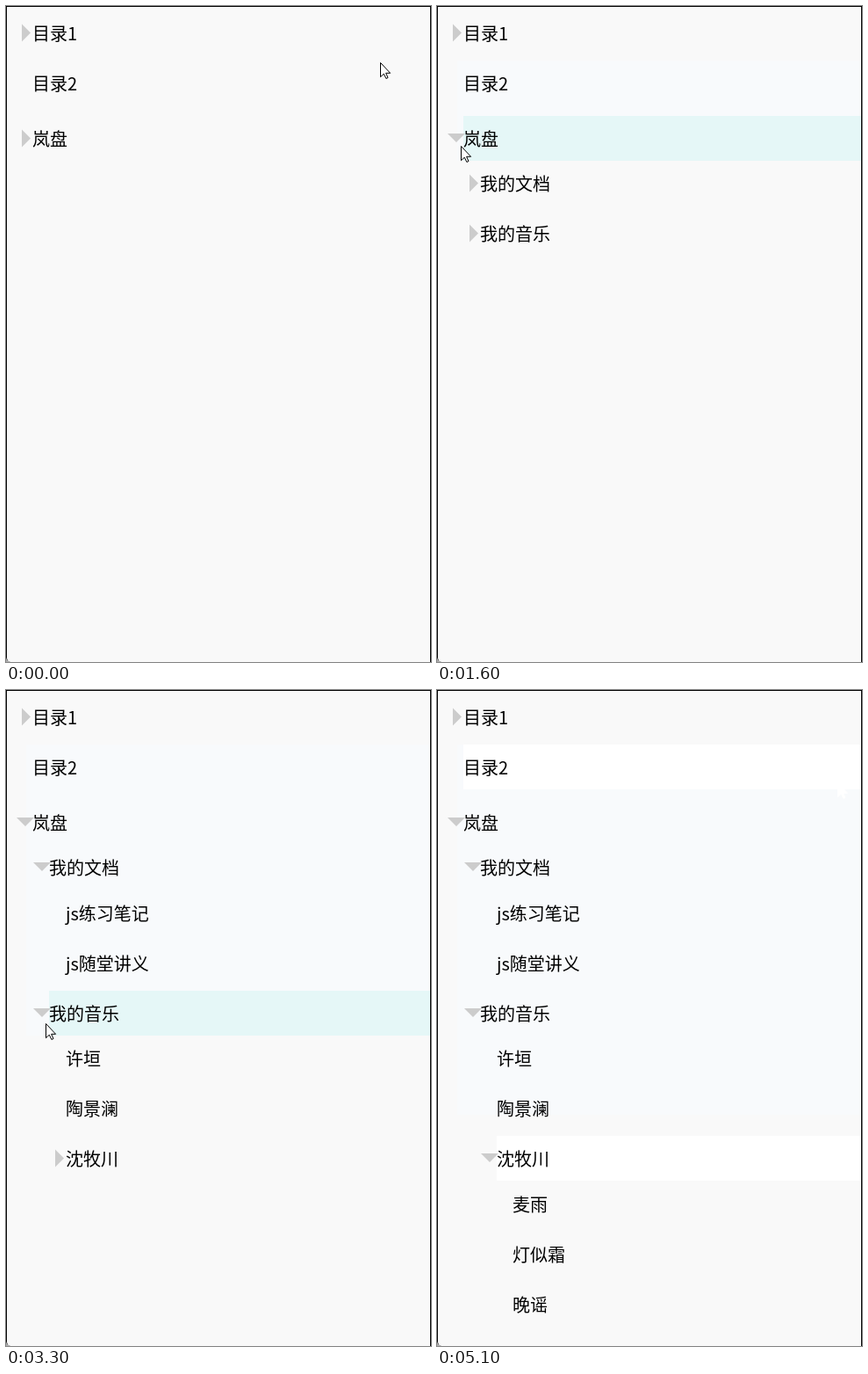
Animation, 484 px wide and 746 px high, one loop 5700 ms. Source, as an HTML page:

```html
<!DOCTYPE html>
<html lang="zh-CN">
<head>
<meta charset="utf-8">
<title>目录</title>
<style>
html, body { margin: 0; width: 100%; height: 100%; overflow: hidden; background: #aaa; }
#stage {
  position: absolute; left: 0; top: 0; width: 484px; height: 746px; overflow: hidden;
  background: #f9f9f9; border-bottom-left-radius: 5px;
  font: 20px/51px "Noto Sans CJK SC", "Noto Sans CJK", sans-serif; color: #000;
}
#stage > * { position: absolute; }
#frame { inset: 0; border: solid #000; border-width: 1px 1px 0; border-bottom-left-radius: 5px; }
#tint { left: 23px; top: 62px; right: 1px; background: #f8fafc; }
.row { right: 1px; height: 51px; white-space: nowrap; }
.row svg { position: absolute; left: -20px; top: 0; width: 24px; height: 51px; fill: #ccc; }
.row span { position: relative; }
#cursor { left: 0; top: 0; width: 14px; height: 21px; overflow: visible; fill: #fff; }
</style>
</head>
<body>
<div id="stage"><div id="tint"></div><div id="frame"></div></div>
<script>
const LOOP = 5700, STEP = 100, END = 5100, NEVER = Infinity;
const CLOUD = 1100, DOCS = 2400, MUSIC = 3200, SINGER = 4200;
const INDENT = [30, 49, 68, 86];
const RIGHT = 'M8 15.5 18 25.5 8 35.5z', DOWN = 'M2 20H22L12 30z';

// text, depth, time shown, time opened (absent: no arrow), time it turns white
const rows = [
  ['目录1', 0, 0, NEVER],
  ['目录2', 0, 0, null, END],
  ['岚盘', 0, 0, CLOUD],
  ['我的文档', 1, CLOUD, DOCS],
  ['js练习笔记', 2, DOCS],
  ['js随堂讲义', 2, DOCS],
  ['我的音乐', 1, CLOUD, MUSIC],
  ['许垣', 2, MUSIC],
  ['陶景澜', 2, MUSIC],
  ['沈牧川', 2, MUSIC, SINGER, SINGER],
  ['麦雨', 3, SINGER],
  ['灯似霜', 3, SINGER],
  ['晚谣', 3, SINGER],
].map(([text, depth, shown, opened, white = NEVER]) =>
  ({ text, left: INDENT[depth], depth, shown, opened, white }));

// cursor path: time, x, y
const path = [
  [0, 426, 64], [600, 23, 150], [700, 12, 152], [800, 9, 152], [900, 9, 152],
  [1000, 15, 150], [1100, 19, 149], [1500, 23, 151], [2100, 44, 197],
  [2200, 43, 196], [2400, 43, 196], [2900, 38, 367], [3000, 41, 364],
  [3200, 41, 364], [3300, 45, 379], [3700, 60, 521], [3800, 59, 523],
  [4400, 59, 523], [4700, 456, 186], [5000, 456, 105], [LOOP, 456, 105],
];
const tints = [[0, 0], [600, 114], [2900, 331], [3700, 421]];

const stage = document.getElementById('stage');
const tint = document.getElementById('tint');

for (const r of rows) {
  r.el = document.createElement('div');
  r.el.className = 'row';
  r.el.style.left = r.left + 'px';
  r.el.innerHTML = (r.opened ? '<svg><path/></svg>' : '') + `<span>${r.text}</span>`;
  r.arrow = r.el.querySelector('path');
  stage.append(r.el);
}
stage.insertAdjacentHTML('beforeend',
  '<svg id="cursor"><path d="M.5.5V16.7L4.3 13.2 6.9 18.5 9 17.5 6.6 12.3H11.6Z"/></svg>');
const cursor = document.getElementById('cursor');

function cursorAt(t) {
  const i = path.findIndex(p => p[0] > t);
  const [t0, x0, y0] = path[i - 1], [t1, x1, y1] = path[i];
  const k = (t - t0) / (t1 - t0);
  return [Math.round(x0 + (x1 - x0) * k), Math.round(y0 + (y1 - y0) * k)];
}

// the label's full height reacts, and the area of its arrow
function hit(r, top, x, y) {
  const dy = y - top;
  if (x >= r.left) return dy >= 0 && dy < 51;
  return r.arrow && x >= r.left - 13 && dy > 14 && dy < 40;
}

function draw(time) {
  const t = Math.floor(time / STEP) * STEP;
  const [x, y] = cursorAt(t);
  const live = t > 0 && t < END;
  let top = 5, last = null;
  rows.forEach((r, i) => {
    const s = r.el.style, visible = t >= r.shown;
    s.display = visible ? '' : 'none';
    if (!visible) return;
    if (last) top += r.depth > last.depth ? 51.5 : 57;
    if (i === 2) top += 6;
    last = r;
    const py = Math.floor(top);
    s.top = py + 'px';
    s.background = t >= r.white ? '#fff' : live && hit(r, py, x, y) ? '#e5f7f7' : 'none';
    if (r.arrow) r.arrow.setAttribute('d', t >= r.opened ? DOWN : RIGHT);
  });
  tint.style.height = tints.findLast(s => s[0] <= t)[1] + 'px';
  cursor.style.transform = `translate(${x}px, ${y}px)`;
  cursor.style.stroke = t >= END ? '#fff' : '#000';
}

const start = performance.now();
function tick() {
  draw(Math.max(0, performance.now() - start) % LOOP);
  requestAnimationFrame(tick);
}
draw(0);
requestAnimationFrame(tick);
</script>
</body>
</html>
```
